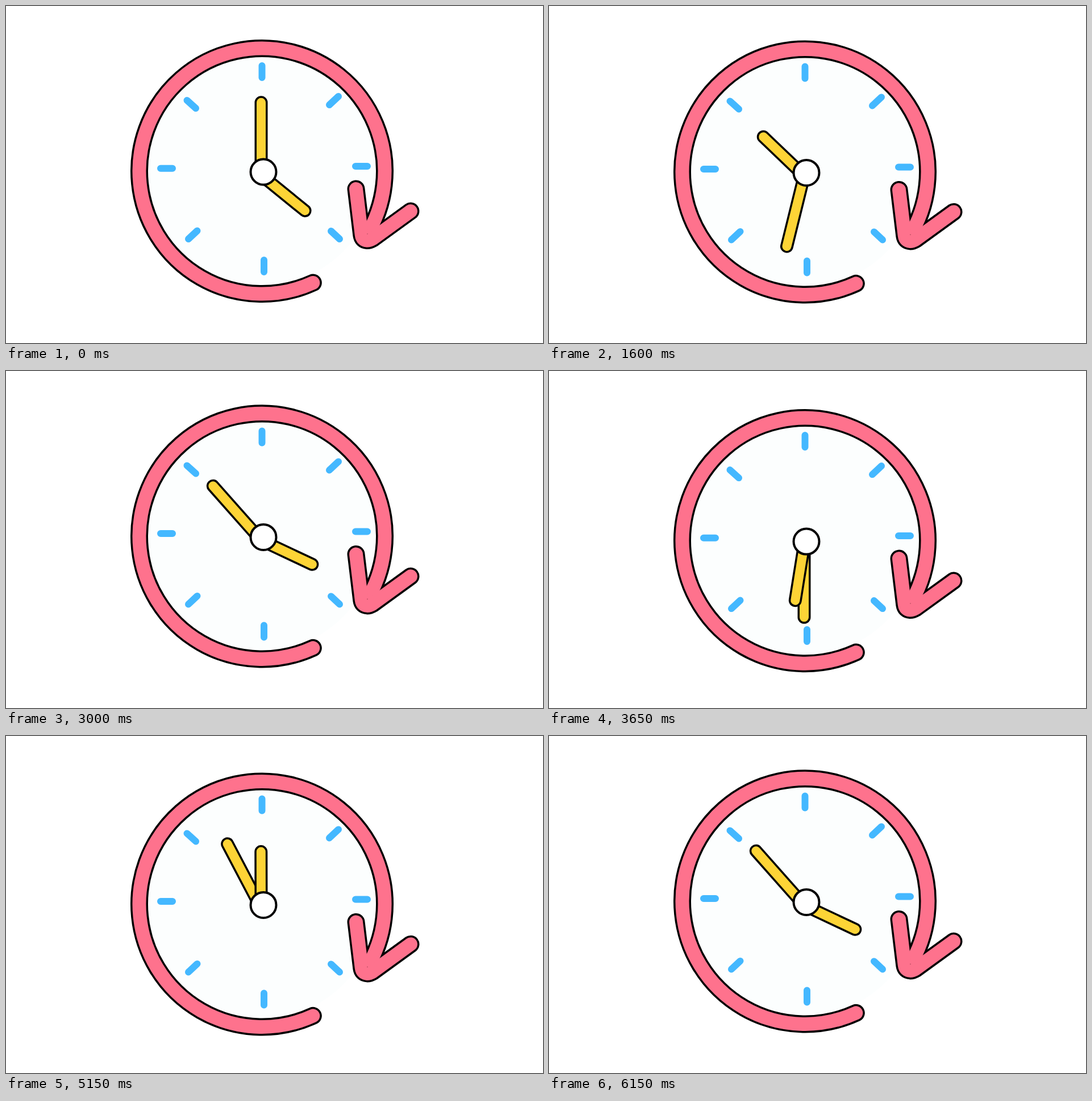
Write an HTML page that moves like this. It is 945x593 px and loops after 6.2 s.

```html
<!DOCTYPE html>
<html lang="en">
<head>
<meta charset="utf-8">
<title>Clock</title>
<style>
  html, body { margin: 0; width: 100%; height: 100%; overflow: hidden; background: #fff; }
  svg { display: block; width: 100%; height: 100%; }
  path, line { fill: none; stroke-linecap: round; stroke-linejoin: round; }
  .outline { stroke: #000; stroke-width: 31; }
  .pink { stroke: #fe728d; stroke-width: 24; }
  .ticks { stroke: #44b8ff; stroke-width: 12; }
  .hand .edge { stroke: #000; stroke-width: 23; }
  .hand .face { stroke: #fdd436; stroke-width: 16; }
</style>
</head>
<body>
<svg viewBox="0 0 945 593">
  <defs>
    <g id="arrow">
      <path d="M540.3 487A216 216 0 1 1 633.5 405.3"/>
      <path d="M616 322L625.8 403Q627 412 635.5 412.5Q640 412.5 645.5 409.2L712 361"/>
    </g>
  </defs>
  <g id="clock">
    <circle cx="450.3" cy="290.8" r="201" fill="#fcfefe"/>
    <use href="#arrow" class="outline"/>
    <use href="#arrow" class="pink"/>
    <circle cx="636" cy="401" r=".8" fill="#b04a5c"/>
    <path class="ticks" d="M450.5 105v21M585 159l-16 15M615 282h21M572 396l15 14M454 447v21M336.5 395.5l-15.5 14.5M272 285.7h21M318.5 166l15.5 14"/>
    <g class="hand" id="minute">
      <line class="edge" y2="-127.7"/>
      <line class="face" y2="-127.7"/>
    </g>
    <g class="hand" id="hour">
      <line class="edge" y2="-99.3"/>
      <line class="face" y2="-99.3"/>
    </g>
    <circle cx="453" cy="292" r="22.5" fill="#fff" stroke="#000" stroke-width="4"/>
  </g>
</svg>
<script>
  const LOOP = 6200, TICK = 50;       // display steps, ms
  const STEP = 40, STEPS = 78;        // motion steps: three turns of the minute hand
  const BOB = [[0, 0], [2, 0.1], [16, 10.3], [19, 11.5], [22, 9.5], [35, 0.5],
               [36.5, 0], [56, 7.8], [76, 0], [78, 0]];
  const [clock, minute, hour] = ["clock", "minute", "hour"].map(id => document.getElementById(id));

  function bob(i) {
    const k = BOB.findIndex(([x]) => x > i);
    const [x0, y0] = BOB[k - 1], [x1, y1] = BOB[k];
    return y0 + (y1 - y0) * (i - x0) / (x1 - x0);
  }

  function turn(hand, angle) {
    hand.setAttribute("transform", `translate(449 297.5) rotate(${angle})`);
  }

  function draw() {
    const t = Math.floor(performance.now() % LOOP / TICK) * TICK;
    const i = Math.floor(t / STEP) % STEPS;
    const angle = i * 1080 / STEPS;
    clock.setAttribute("transform", `translate(0 ${bob(i)})`);
    turn(minute, angle);
    turn(hour, 129.1 + angle / 3);
    requestAnimationFrame(draw);
  }
  draw();
</script>
</body>
</html>
```
